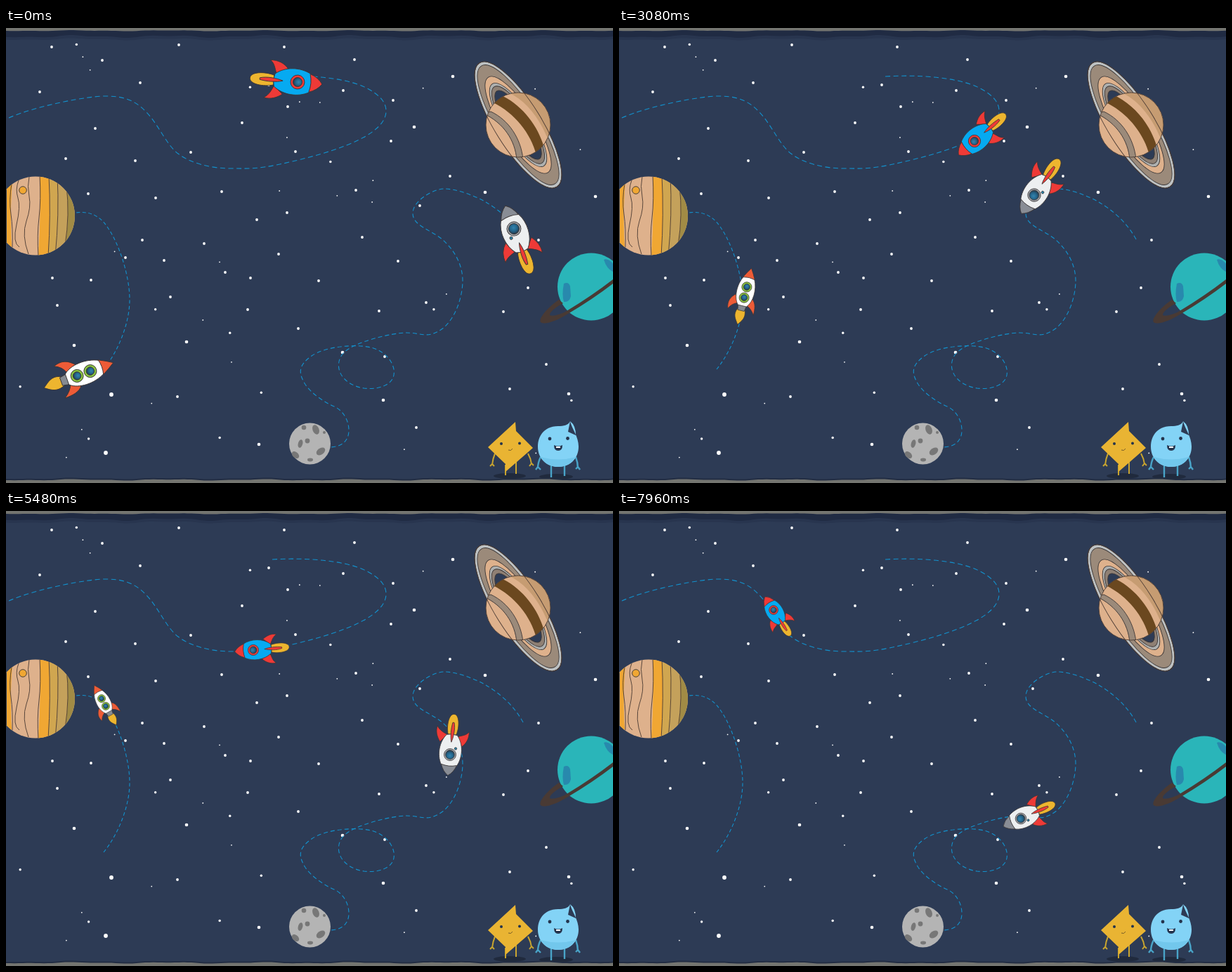
These frames come from a looping animation (864x648 px, 8000 ms). An HTML page:

```html
<!DOCTYPE html>
<html lang="en">
<head>
<meta charset="utf-8">
<title>Space flight</title>
<style>
  html, body { margin: 0; width: 100%; height: 100%; overflow: hidden; background: #2d3b55; }
  svg { display: block; width: 100vw; height: 100vh; }
  .route { fill: none; stroke: #1291cd; stroke-width: 1.1; stroke-dasharray: 7 4.5; }
  .ink { stroke: #3a3535; stroke-width: .9; stroke-linejoin: round; }
  .line { fill: none; stroke: #4a3a33; stroke-width: .9; }
</style>
</head>
<body>
<svg viewBox="0 0 864 648" preserveAspectRatio="none">
  <defs>
    <clipPath id="stripedDisc"><circle cx="42" cy="267.5" r="56"/></clipPath>
    <clipPath id="ringedDisc"><circle cx="729" cy="138" r="46"/></clipPath>
    <clipPath id="tealDisc"><circle cx="833" cy="368.5" r="48"/></clipPath>
    <radialGradient id="glass" cx=".62" cy=".5" r=".6">
      <stop offset="0" stop-color="#3484ae"/><stop offset=".55" stop-color="#23658b"/><stop offset="1" stop-color="#263a4b"/>
    </radialGradient>
    <pattern id="dots" width="3" height="3" patternUnits="userSpaceOnUse">
      <rect width="3" height="3" fill="#f05a35"/><circle cx="1" cy="1" r=".6" fill="#d9674a"/>
    </pattern>
    <g id="finnedRocket" class="ink">
      <path fill="#edb52f" d="M-34-7C-48-11-68-9-68 0S-48 11-34 7Z"/>
      <path fill="#ee3a37" d="M-15-18C-21-25-30-29-41-28C-34-23-34-16-31-10ZM-20 19C-28 25-36 28-46 26C-38 21-36 14-33 8Z"/>
      <path fill="currentColor" d="M-33-9C-20-20 2-22 18-13Q21 0 18 13C2 22-20 20-33 9Q-36 0-33-9Z"/>
      <path d="M17-13Q29-9 35 0Q29 9 17 13Q21 0 17-13Z"/>
      <path fill="#ee3a37" d="M-54-1.5C-44-4.5-30-3-21 0C-30 3-44 3-54 1Z"/>
    </g>
  </defs>

  <rect width="864" height="648" fill="#2d3b55"/>
  <g id="stars" fill="#fff"></g>

  <g class="route">
    <path d="M379 69C430 66 480 71 508 83C532 94 541 106 541 118C541 150 480 172 420 187S350 200 320 200S262 192 245 179S218 139 200 120S165 97 141 97S45 110 4 128"/>
    <path stroke-dasharray="5 3.5" d="M139 486C160 460 176 420 176 387S162 310 146 286C136 270 122 260 99 263"/>
    <path stroke-dasharray="6 4" d="M736 301C722 275 700 258 683 248S640 229 624 229S579 246 579 264S605 287 622 302S650 338 650 360S640 415 620 429S590 434 570 434S495 447 480 463"/>
    <path stroke-dasharray="6 4" d="M480 463C470 475 472 490 482 500C500 519 540 517 550 500C558 485 545 463 523 456S455 453 435 467S417 492 425 506S455 534 467 539S488 558 488 573S478 597 460 597"/>
  </g>

  <!-- striped planet -->
  <g clip-path="url(#stripedDisc)">
    <rect x="1" y="210" width="100" height="115" fill="#deb18c"/>
    <path fill="#f0a733" d="M0 210H10Q4 265 9 325H0ZM48 210H61Q64 265 60 325H46Q50 265 48 210Z"/>
    <path fill="#d0a650" d="M61 210H73Q76 265 70 325H60Q64 265 61 210Z"/>
    <path fill="#c4a15b" d="M73 210H86Q91 265 84 325H70Q76 265 73 210Z"/>
    <path fill="#a18b45" d="M84 210H101V325H82Q93 265 84 210Z"/>
    <path class="line" d="M8 222Q4 245 7 265T9 312M18 217Q13 230 17 242T15 280T19 312M33 212Q30 225 33 240T29 275T32 322"/>
    <path class="line" d="M48 210Q50 245 47 270T46 325M61 210Q64 265 60 325M73 210Q76 265 70 325M86 225Q91 265 84 310"/>
    <circle cx="24" cy="231" r="5.3" fill="#f0a733" class="ink"/>
    <rect x="0" y="210" width="1" height="115" fill="#2d3b55"/>
  </g>

  <!-- ringed planet -->
  <g transform="translate(729 138) rotate(58)" class="ink">
    <ellipse rx="104" ry="33" fill="#bdc1c2"/>
    <ellipse rx="99" ry="29" fill="#9b8a7a"/>
    <ellipse rx="80" ry="24" fill="#deb18c"/>
    <ellipse rx="69" ry="21" fill="#aeb0af"/>
    <ellipse rx="64" ry="19" fill="#8f8074"/>
    <ellipse rx="57" ry="16" fill="#2d3b55"/>
  </g>
  <circle cx="729" cy="138" r="46" fill="#deb18c"/>
  <g clip-path="url(#ringedDisc)">
    <path fill="#c69c72" d="M706 88C738 99 762 128 777 174L790 150L770 85Z"/>
    <path fill="#6b481f" d="M693 106L703 95C733 108 758 139 766 171L755 181C747 150 724 121 693 106Z"/>
    <path fill="#9b8a7a" class="ink" d="M680 122L690 119C716 131 733 158 736 187L727 188C725 160 708 135 680 122Z"/>
  </g>
  <ellipse rx="104" ry="33" transform="translate(729 138) rotate(58)" class="line"/>
  <circle cx="729" cy="138" r="46" class="line"/>

  <!-- teal planet -->
  <circle cx="833" cy="368.5" r="48" fill="#2ab5b9"/>
  <g clip-path="url(#tealDisc)" fill="#2889ad">
    <path d="M794 364Q801 361 803 368L804 382Q802 391 794 390Q791 380 794 364Z"/>
    <path d="M851 330Q857 327 866 338V348Q855 344 851 330Z"/>
  </g>
  <path fill="#493a34" d="M787 387C772 397 757 414 761 419C766 424 786 416 800 407Q834 387 864 364V358Q833 382 798 403C790 408 778 411 774 409C773 405 783 397 793 392Z"/>

  <!-- moon -->
  <circle cx="432.5" cy="592" r="29.5" fill="#b4b4b4"/>
  <g fill="#777">
    <circle cx="424" cy="569" r="3.3"/><circle cx="453" cy="576" r="2"/><circle cx="429" cy="588" r="3.4"/>
    <ellipse rx="4.5" ry="7" transform="translate(441 572) rotate(-22)"/>
    <ellipse rx="3.2" ry="6" transform="translate(419 592) rotate(15)"/>
    <ellipse rx="7" ry="4.5" transform="translate(448 603) rotate(-35)"/>
    <ellipse rx="6" ry="4" transform="translate(412 608) rotate(42)"/>
    <ellipse cx="433" cy="615" rx="4" ry="2.4"/>
  </g>

  <!-- diamond and drop -->
  <g fill="#202a3d">
    <ellipse cx="717" cy="638" rx="23" ry="4"/><ellipse cx="783" cy="639" rx="24" ry="4"/>
  </g>
  <path fill="none" stroke="#c9a52f" stroke-width="2" d="M696 606Q693 613 692 622M689 624L692 621L695 624M743 606Q747 613 748 621M745 624L748 620L751 623M711 622V637M726 616V635"/>
  <path fill="#e9b433" d="M725 561L686 597L711 621V632L750 598L726 574Z"/>
  <path fill="none" stroke="#49a4c8" stroke-width="2.4" d="M761 611Q757 619 757 627M754 629L757 625L761 629M811 611Q814 619 814 627M811 628L814 625L817 629M776 620V640M795 620V638"/>
  <path fill="#83d3f6" d="M803 560C800 566 794 567 786 567C768 567 757 579 757 596S769 625 786 625S815 613 815 596C815 582 806 572 803 560ZM803 560Q811 566 811 580L800 575Z"/>
  <path fill="#72c7ec" d="M761 611Q786 618 811 611C806 620 797 625 786 625S766 620 761 611Z"/>
  <g fill="#24344d">
    <circle cx="705" cy="592" r="2"/><circle cx="731" cy="591.5" r="2"/>
    <circle cx="774" cy="585" r="2.4"/><circle cx="799.5" cy="584.5" r="2.4"/>
    <path d="M780 594Q786 597 792 594Q792 602 786 602T780 594Z"/>
    <path d="M715 601Q719 603 721 599" fill="none" stroke="#765c28"/>
  </g>
  <path d="M783 596H789V598H783Z" fill="#fff"/>

  <g id="blueRocket" color="#06aaf1">
    <use href="#finnedRocket" fill="#ee3a37"/>
    <circle r="10" fill="#ee3a37" class="ink"/><circle r="6.5" fill="url(#glass)" class="ink"/>
  </g>
  <g id="whiteRocket" color="#edeff0">
    <use href="#finnedRocket" fill="#898d95"/>
    <circle r="10" fill="#a7abb0" class="ink"/><circle r="7.5" fill="url(#glass)" class="ink"/>
    <circle cx="-11" cy="-8.3" r="2" fill="#2688b0" class="ink"/>
  </g>
  <g id="greenRocket" class="ink">
    <path fill="#edb52f" d="M-32-7C-45-13-52-5-60 0C-52 6-45 12-32 7Z"/>
    <path fill="#858a91" d="M-34-6L-23-8V8L-34 6Z"/>
    <path fill="url(#dots)" d="M-7-16C-14-24-23-29-36-24Q-25-19-22-9ZM-9 15C-15 23-25 24-37 24Q-26 17-23 8Z"/>
    <path fill="#fff" d="M-25-8C-14-18 10-19 27-10Q30 0 27 10C10 19-14 18-25 8Z"/>
    <path fill="url(#dots)" d="M26-11Q36-6 45 0Q36 6 26 11Q29 0 26-11Z"/>
    <g fill="#8bc540"><circle cx="10" r="9"/><circle cx="-10" r="9"/></g>
    <g fill="url(#glass)"><circle cx="10" r="5.7"/><circle cx="-10" r="5.7"/></g>
  </g>

  <g id="borders"></g>
</svg>
<script>
const LOOP = 8000, FRAME = 40;
const byId = id => document.getElementById(id);
const dot = (x, y, r) => `<circle cx="${x}" cy="${y}" r="${r}"/>`;

// Bright stars as x, y pairs, largest first; the faint ones are scattered by a seeded generator.
const brightStars = [
  150,522, 142,605, 257,447, 97,452, 479,462, 537,530, 801,521, 360,593, 636,69, 682,234, 839,240, 581,141,
  65,27, 137,46, 191,78, 246,24, 396,27, 496,45, 48,91, 127,143, 85,186, 184,189, 263,177, 374,81, 401,112,
  336,135, 412,176, 480,89, 551,103, 548,161, 632,211, 498,231, 589,253, 117,236, 213,242, 307,233, 357,273,
  400,263, 194,302, 170,327, 225,331, 282,307, 388,322, 507,298, 312,348, 348,356, 445,360, 558,332, 121,359,
  66,356, 73,395, 234,383, 344,401, 416,428, 598,391, 531,403, 708,404, 743,370, 758,302, 539,468, 584,569,
  717,514, 769,479, 244,525];

let seed = 29;
const random = () => (seed = seed * 16807 % 2147483647) / 2147483647;
let stars = '';
for (let i = 0; i < brightStars.length; i += 2)
  stars += dot(brightStars[i], brightStars[i + 1], i < 4 ? 2.9 : i < 24 ? 2.3 : 1.9);
for (let i = 0; i < 36; i++)
  stars += dot(20 + 820 * random(), 22 + 600 * random(), i % 3 ? .9 : 1.7);
byId('stars').innerHTML = stars;

// Ragged strip between a stage edge and a wavy line.
function strip(edge, level, swing, color) {
  let d = `M0 ${edge}`;
  for (let x = 0; x <= 864; x += 6)
    d += `L${x} ${(level + swing * (Math.sin(x / 21) + .6 * Math.sin(x / 9 + 1))).toFixed(1)}`;
  return `<path d="${d}L864 ${edge}Z" fill="${color}"/>`;
}
byId('borders').innerHTML =
  strip(0, 16, 1, '#28354f') + strip(0, 12, 1.3, '#202b43') + strip(0, 3.8, .5, '#747570') +
  strip(648, 641.5, .7, '#222d43') + strip(648, 643.5, .7, '#747570');

// Poses are x, y and heading in degrees at the shared times; each craft shrinks steadily as it flies.
const times = [0, 1.92, 3.08, 4.12, 5.48, 6.92, 7.96];
const blue = {
  node: byId('blueRocket'), shrink: .0447,
  x: [415, 519, 506, 441, 352, 265, 220],
  y: [77, 113, 161, 184, 198, 186, 141],
  heading: [5, 73, 139, 164, 175, 217, 237]
};
const white = {
  node: byId('whiteRocket'), shrink: .0272,
  x: [723, 644, 591, 604, 632, 613, 572],
  y: [286, 222, 238, 288, 347, 410, 438],
  heading: [-110.5, -166, -235, -307.5, -264, -212, -204]
};
const green = {
  node: byId('greenRocket'), shrink: .07, fade: [6.4, 7.6],
  x: [110.5, 168.5, 180, 168.5, 139, 107.5, 91],
  y: [492, 429, 376.5, 328.5, 272.5, 258.5, 253],
  heading: [-20, -54.7, -76, -94, -119, -146, -160]
};

const last = times.length - 1;
const gap = i => times[i + 1] - times[i];
const slope = (values, i) => (values[i + 1] - values[i]) / gap(i);

function tangent(values, i) {
  if (i === 0) return 1.5 * slope(values, 0) - .5 * tangent(values, 1);
  if (i === last) return 1.5 * slope(values, last - 1) - .5 * tangent(values, last - 1);
  return (gap(i) * slope(values, i - 1) + gap(i - 1) * slope(values, i)) / (gap(i) + gap(i - 1));
}

// Cubic Hermite interpolation.
function sample(values, t) {
  let i = 0;
  while (i < last - 1 && t >= times[i + 1]) i++;
  const u = (t - times[i]) / gap(i), v = 1 - u;
  return values[i] * v * v * (1 + 2 * u) + values[i + 1] * u * u * (3 - 2 * u) +
    gap(i) * u * v * (v * tangent(values, i) - u * tangent(values, i + 1));
}

function draw(now) {
  const t = Math.floor(now % LOOP / FRAME) * FRAME / 1000;
  for (const { node, shrink, fade, x, y, heading } of [blue, white, green]) {
    const [px, py, angle] = [x, y, heading].map(values => sample(values, t).toFixed(2));
    node.setAttribute('transform', `translate(${px} ${py}) rotate(${angle}) scale(${1 - shrink * t})`);
    if (fade) node.setAttribute('opacity', Math.min(1, Math.max(0, (fade[1] - t) / (fade[1] - fade[0]))));
  }
}

const start = performance.now();
function tick() {
  draw(performance.now() - start);
  requestAnimationFrame(tick);
}
tick();
</script>
</body>
</html>
```
